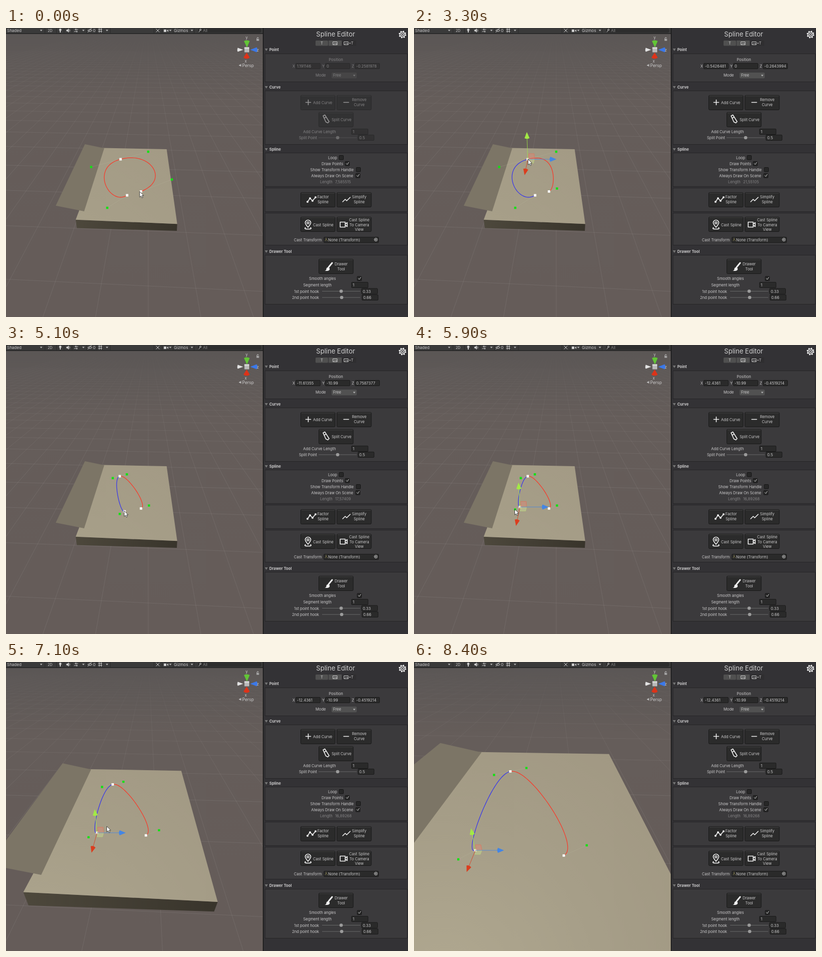
Write an HTML page that moves like this. It is 800 px wide and 577 px high and loops after 9200 ms.

```html
<!DOCTYPE html>
<html lang="en">
<head>
<meta charset="utf-8">
<title>Spline Editor</title>
<style>
html, body { margin: 0; width: 100%; height: 100%; overflow: hidden; background: #333235; }
svg { display: block; width: 800px; height: 577px; }
text { font: 7.6px Inter, Roboto, sans-serif; fill: #cbcacb; white-space: pre; }
.head { font-weight: 700; }
.mid { text-anchor: middle; }
.end { text-anchor: end; }
.bar { font-size: 8px; }
.icon { fill: none; stroke: #f0f0f0; stroke-width: 1.6; stroke-linecap: round; stroke-linejoin: round; }
.small { stroke: #c8c8c8; stroke-width: 1; }
</style>
</head>
<body>
<svg id="stage" viewBox="0 0 800 577" xmlns="http://www.w3.org/2000/svg">
  <defs>
    <linearGradient id="ground" x1="0" y1="0" x2="0" y2="1">
      <stop offset="0" stop-color="#5a5655"/><stop offset=".25" stop-color="#655d5a"/><stop offset="1" stop-color="#655c59"/>
    </linearGradient>
    <linearGradient id="fade" gradientUnits="userSpaceOnUse" x1="0" y1="12" x2="0" y2="260">
      <stop offset="0" stop-color="#fff" stop-opacity="0"/><stop offset=".4" stop-color="#fff" stop-opacity=".04"/>
      <stop offset="1" stop-color="#fff" stop-opacity=".075"/>
    </linearGradient>
    <radialGradient id="topFace" gradientUnits="userSpaceOnUse" cx="60" cy="640" r="620">
      <stop offset="0" stop-color="#b0a890"/><stop offset=".5" stop-color="#a69e88"/><stop offset="1" stop-color="#a09782"/>
    </radialGradient>
    <linearGradient id="frontFace"><stop offset="0" stop-color="#4d483c"/><stop offset="1" stop-color="#38342b"/></linearGradient>
  </defs>
  <rect width="512" height="577" fill="url(#ground)"/>
  <path id="grid" fill="none" stroke="url(#fade)"/>
  <path id="front" fill="url(#frontFace)"/>
  <path id="top" fill="url(#topFace)"/>
  <path id="flap" fill="#7c7566"/>
  <path id="arms" fill="none" stroke="#cdd8b8" stroke-opacity=".13"/>
  <path id="right" fill="none" stroke-width="1.2"/>
  <path id="left" fill="none" stroke-width="1.2"/>
  <path id="handles" fill="#12e212"/>
  <path id="nodes" fill="#fff"/>
  <g id="gizmo"></g>
  <g id="axes"></g>
  <path id="cursor" d="M0 0V11.2L2.7 8.8L4.5 12.7L6.4 11.8L4.6 8H8Z" fill="#fff" stroke="#222" stroke-width=".8"/>
  <g id="toolbar"></g>
  <g id="panel"></g>
</svg>
<script>
const $ = id => document.getElementById(id);
const set = (id, name, value) => $(id).setAttribute(name, value);

// ---- static interface ----
const text = (x, y, s, more = '') => `<text x="${x}" y="${y}" ${more}>${s}</text>`;
const mid = (x, y, s) => text(x, y, s, 'class="mid"');
const rect = (x, y, w, h, fill, more = '') => `<rect x="${x}" y="${y}" width="${w}" height="${h}" fill="${fill}" ${more}/>`;
const icon = (d, cls = '') => `<path class="icon ${cls}" d="${d}"/>`;
const arrow = (x, y) => `<path d="M${x - 2.5} ${y - 1.5}h5l-2.5 3z" fill="#b5b5b5"/>`;
const box = (y, h) => rect(515.5, y + .5, 283, h, '#3b3a3c', 'stroke="#262527"');
const button = (x, y) => rect(x + .5, y + .5, 68.5, 29, '#2b2b2b', 'rx="2" stroke="#191919"') +
  `<path d="M${x + 2} ${y + 1.5}h66" stroke="#444"/>`;
const field = (x, y, w, s, id = '') => rect(x + .5, y + .5, w - 1, 11, '#2a2a2a', 'rx="1.5" stroke="#1b1b1b"') +
  text(x + 3, y + 9, s, id && `id="${id}"`);
const check = (x, y, on) => rect(x - 4, y - 4, 8.5, 8.5, '#282828', 'rx="1" stroke="#151515"') +
  (on ? icon(`M${x - 2} ${y}l2 2l3.2 -4.4`, 'small') : '');
const slider = (x, y, knob) => `<path d="M${x} ${y}h76" stroke="#686868"/><circle cx="${knob}" cy="${y}" r="3.3" fill="#9b9b9b"/>`;
const heading = (y, s) => `<path d="M515 ${y - 5}h6l-3 5z" fill="#777"/>` + text(524, y, s, 'class="head"');
const picture = (x, y) => icon(`M${x} ${y}h8v6h-8zM${x + 1} ${y + 5}l2.5 -2.5l1.5 1.5l1.5 -1l1 2`, 'small');

$('panel').innerHTML = rect(511, 0, 289, 577, '#333235') + rect(511, 0, 1.5, 577, '#1a1a1a') +
  text(656, 17, 'Spline Editor', 'class="mid" style="font-size:13px;fill:#d2d2d2"') +
  '<g fill="none" stroke="#f2f2f2"><circle cx="789" cy="13" r="6.4" stroke-width="2.2" stroke-dasharray="2.5 2.53"/>' +
  '<circle cx="789" cy="13" r="5" stroke-width="1.5"/><circle cx="789" cy="13" r="2.2" stroke-width="1.3"/></g>' +
  rect(616, 25, 25, 10.5, '#505050', 'rx="1.5"') + rect(642, 25, 26, 10.5, '#505050') + rect(669, 25, 28, 10.5, '#2f2e30', 'rx="1.5"') +
  mid(628.5, 33, 'T') + picture(651, 27.5) + picture(673, 27.5) + text(682, 33, '+T') +
  heading(46, 'Point') + box(51, 56) +
  '<g id="pointBox">' + mid(656.5, 66, 'Position') +
  text(570, 79, 'X') + field(576, 70, 50, '', 'px') + text(629, 79, 'Y') + field(635, 70, 50, '', 'py') +
  text(688, 79, 'Z') + field(694, 70, 50, '', 'pz') +
  text(616, 97, 'Mode') + rect(648, 89, 50, 11.5, '#515151', 'rx="2"') + text(651, 97, 'Free') + arrow(693, 95) + '</g>' +
  heading(121, 'Curve') + box(125, 107) +
  '<g id="curveBox">' + button(586, 134) + button(658, 134) + button(622, 168) +
  icon('M596.5 148.5h10M601.5 143.5v10') + text(611, 151.5, 'Add Curve') +
  icon('M672 148.5h10') + mid(703, 146, 'Remove') + mid(703, 156, 'Curve') +
  icon('M631 175.5l3.500 -2l8.500 13.500l-2.500 2.500l-4 -2zM633 180l4 -2') + text(648, 185.5, 'Split Curve') +
  text(656.5, 209.5, 'Add Curve Length', 'class="end"') + field(687, 201, 34, '1') +
  text(619, 221.5, 'Split Point', 'class="end"') + slider(622, 219, 660) + field(700, 213, 33, '0.5') + '</g>' +
  heading(245, 'Spline') + box(249, 67) + box(319, 47) + box(369, 64) +
  [['Loop', 659, 258.5, 667, 0], ['Draw Points', 671, 270.5, 679, 1], ['Show Transform Handle', 692, 282.5, 701, 0],
   ['Always Draw On Scene', 691, 294.5, 700, 1]].map(([s, x, y, c, on]) => text(x, y + 3, s, 'class="end"') + check(c, y, on)).join('') +
  '<g opacity=".5">' + text(625, 309.5, 'Length') + text(655, 309.5, '', 'id="length"') + '</g>' +
  button(586, 328) + button(658, 328) + button(586, 377) + button(658, 377) +
  icon('M600 347l5 -7l5 5l6 -7') + '<g fill="#f0f0f0"><circle cx="600" cy="347" r="2"/><circle cx="605" cy="340" r="2"/><circle cx="610" cy="345" r="2"/><circle cx="616" cy="338" r="2"/></g>' +
  mid(631, 340, 'Factor') + mid(631, 350, 'Spline') +
  icon('M670 347l5 -5l3 3l7 -7') + mid(703, 340, 'Simplify') + mid(703, 350, 'Spline') +
  icon('M601 398c-4 -5 -5.500 -7 -5.500 -9a5.500 5.500 0 0 1 11 0c0 2 -1.500 4 -5.500 9zM599 389a2 2 0 1 0 4 0a2 2 0 1 0 -4 0M596 398.500q-4 3 5 3t5 -3') +
  text(611, 395.5, 'Cast Spline') + icon('M665 387.500h10v10h-10zM675 391.500l4 -3v8l-4 -3') +
  mid(703, 386, 'Cast Spline') + mid(703, 395.5, 'To Camera') + mid(703, 405, 'View') +
  text(573, 425.5, 'Cast Transform') + field(632, 417, 110, '') +
  '<path d="M637 419v3l-2 3M637 422l3 3" fill="none" stroke="#b4a95e" stroke-dasharray="1.5 1"/>' + text(641, 425.5, 'None (Transform)') +
  icon('M733 422.500a3 3 0 1 0 6 0a3 3 0 1 0 -6 0', 'small') + '<circle cx="736" cy="422.5" r="1.2" fill="#ccc"/>' +
  heading(449, 'Drawer Tool') + box(453, 98) + button(622, 461) +
  '<path d="M642 477.500l7 -8.500" stroke="#f0f0f0" stroke-width="3" stroke-linecap="round"/>' +
  '<path d="M634 485q3.500 -1 3.500 -4t4 -3.500q3.500 2 2.500 5t-10 2.500z" fill="#f0f0f0"/>' +
  mid(667, 474, 'Drawer') + mid(667, 484, 'Tool') +
  text(656.5, 503, 'Smooth angles', 'class="end"') + check(703, 500, 1) +
  text(648, 516, 'Segment length', 'class="end"') + field(687, 507, 34, '1') +
  text(623, 528.5, '1st point hook', 'class="end"') + slider(629, 525.5, 667) + field(707, 519.5, 33, '0.33') +
  text(623, 541, '2nd point hook', 'class="end"') + slider(629, 538, 668) + field(708, 532, 33, '0.66');

$('toolbar').innerHTML = rect(0, 0, 511, 11, '#3a3a3a') + rect(0, 10.5, 511, 1.5, '#242424') +
  [77, 100, 115, 131, 160, 180, 207, 294, 310, 332, 374].map(x => rect(x, 0, 1, 10.5, '#2a2a2a')).join('') +
  text(2, 8, 'Shaded', 'class="bar"') + text(83, 8, '2D', 'class="bar" style="font-size:7px"') + text(334, 8, 'Gizmos', 'class="bar"') +
  rect(382, .5, 126, 9, '#2d2d2d', 'rx="4"') + text(392, 7.5, 'All', 'opacity=".55"') +
  [70, 154, 201, 327, 370].map(x => arrow(x, 5)).join('') +
  '<circle cx="108" cy="3.7" r="2.4" fill="#ccc"/><path d="M107 5h2v4h-2zM120 3.500h2l3 -2.500v8l-3 -2.500h-2zM314 3h5v5h-5zM320 5l3 -2v5z" fill="#ccc"/>' +
  icon('M126.500 3q1.500 2 0 4M137 3h6M136 7h6M139 1.500v3M141 5.500v3M163 5q4 -5 8 0q-4 4 -8 0M163 8.500l7 -8M184 2.500h7M184 6.500h7M185.500 1v8M189.500 1v8M299 2l6 6M305 2l-6 6M386 5l-2 3M385.500 3.500a1.500 1.500 0 1 0 3 0a1.500 1.500 0 1 0 -3 0', 'small') +
  text(173, 8, '0', 'class="bar"');

$('axes').innerHTML =
  '<path d="M461 39.500q-1.500 4 0 8l11 -4z" fill="#e2e2e2"/><path d="M486 43.500l13 -5q2.500 5 0 10z" fill="#3b78e8"/>' +
  '<path d="M473.500 26q5.500 -3 11.500 0l-5.500 13z" fill="#62c536"/><path d="M472.500 59l6.500 -10l6 10q-6 5 -12.500 0z" fill="#dc3319"/>' +
  rect(474.5, 38.5, 9.5, 10, '#b9b9b9') + rect(474.5, 38.5, 9.5, 3, '#d8d8d8') +
  `<g style="font-weight:700">${mid(479, 22, 'y')}${mid(501, 46.5, 'z')}${mid(477, 69, 'x')}</g>` +
  icon('M468 72.500l-4 2l4 2M464 74.500h4', 'small') + text(470, 77.5, 'Persp', 'style="font-size:8.5px"') +
  icon('M499.500 22v-1.500a1.500 1.500 0 0 1 3 0', 'small') + rect(498.5, 22, 5, 3.5, '#aaa');

// ---- timeline ----
const lerp = (a, b, u) => a + (b - a) * u;
const span = (t, a, b) => Math.min(1, Math.max(0, (t - a) / (b - a)));

// Keys are [time, ...values]; straight lines between them.
function track(keys, t) {
  let i = 0;
  while (i < keys.length - 2 && t >= keys[i + 1][0]) i++;
  const [a, b] = [keys[i], keys[i + 1]], u = span(t, a[0], b[0]);
  return a.slice(1).map((v, k) => lerp(v, b[k + 1], u));
}

const paths = {
  A: [[0, 268.7, 326.3], [9200, 268.7, 326.3]],
  Ah: [[2200, 330, 302.5], [2700, 284.5, 320.5]],
  B: [[3100, 228, 262], [3200, 226.4, 262]],
  Br: [[3800, 283, 247], [4500, 240.5, 258.3]],
  Bl: [[3400, 169.5, 277.5], [3600, 212.5, 265.7]],
  Ch: [[4600, 201.5, 359], [4900, 231.4, 339], [5000, 231.4, 339], [5600, 201.3, 328.4]],
  C: [[5000, 241, 334], [5600, 210.9, 323.4]],
  cursor: [[0, 266, 326.5], [300, 269.5, 327.5], [1900, 269.5, 327.5], [2000, 330, 302], [2200, 330, 302], [2700, 285, 320],
    [3200, 227, 262], [3400, 227, 262], [3600, 213, 265], [3800, 213, 265], [3900, 282, 247], [4500, 241, 258], [4600, 241, 258],
    [4700, 201, 359], [4900, 231, 339], [5000, 240, 332.5], [5600, 211, 324], [5900, 200.5, 328], [8100, 200.5, 328], [8400, 50, 370]]
};

// Selected point with its coordinates and the spline length, from start to end of each step.
const steps = [
  { at: 0, to: 100, from: [1.191146, 0, -.2581978], len: [7.585515] },
  { at: 900, to: 1000, point: 'A', side: 'right', gizmo: true, from: [1.106397, 0, .1237561], len: [7.585515] },
  { at: 2000, to: 2100, point: 'Ah', side: 'right', gizmo: true, from: [.6014827, 0, 1.532674], len: [7.585515] },
  { at: 2300, to: 2700, point: 'Ah', side: 'right', from: [-11.94837, -10.99, 5.301746], end: [-12.71862, -10.99, 3.218475], len: [22.41673, 21.55105] },
  { at: 3200, to: 3300, point: 'B', side: 'right', gizmo: true, from: [-.5426481, 0, -.2643994], len: [21.55105] },
  { at: 3300, to: 3400, point: 'B', side: 'left', gizmo: true, from: [-.5426481, 0, -.2643994], len: [21.55105] },
  { at: 3500, to: 3600, point: 'Bl', side: 'left', from: [-14.92716, -10.99, -1.531826], end: [-15.61284, -10.99, -.4173952], len: [21.02647, 20.38415] },
  { at: 3900, to: 4500, point: 'Br', side: 'right', from: [-16.43917, -10.99, 3.184672], end: [-16.02835, -10.99, 1.127463], len: [20.31729, 18.25364] },
  { at: 4700, to: 4900, point: 'Ch', side: 'left', from: [-10.59372, -10.99, -.8613745], end: [-11.36418, -10.99, .5283916], len: [18.14752, 17.71037] },
  { at: 5000, to: 5600, point: 'C', side: 'left', from: [-11.44904, -10.99, 1.0008695], end: [-12.4361, -10.99, -.4519214], len: [17.710372, 16.89268] },
  { at: 5700, to: 5800, point: 'C', side: 'left', gizmo: true, from: [-12.4361, -10.99, -.4519214], len: [16.89268] }
];

// Camera dolly: scale about the view centre grows with nearness to the viewer.
const CX = 254.6, CY = 297.5, HORIZON = -22;
const dolly = t => (.433 * span(t, 6100, 6700) ** 2.3 + .737 * span(t, 6700, 7100) + .77 * (1 - (1 - span(t, 7100, 7700)) ** 2)) / 1000;
const project = (w, [x, y], height = 1) => {
  const s = 1 / (1 - w * height * (y - HORIZON));
  return [CX + (x - CX) * s, CY + (y - CY) * s];
};

const poly = pts => 'M' + pts.map(p => p.map(v => v.toFixed(2))).join('L');
const LOW = .93, HIGH = 1.05;

function gridPath(w) {
  const near = w ? Math.min(577, .9 / (w * LOW) + HORIZON) : 577;
  const line = (a, b) => poly([project(w, a, LOW), project(w, b, LOW)]);
  let d = '';
  for (let k = -20; k <= 20; k++) {
    const at = y => [283 + k * .175 * (y - HORIZON), y];
    d += line(at(0), at(near));
  }
  for (let n = -2; n < 26; n++) {
    const at = x => [x, HORIZON + (1 + x / 11000) / (.0024 + n * .00049)];
    if (at(811)[1] < near) d += line(at(-300), at(811));
  }
  return d;
}

// A cubic lying on the slab, seen in perspective: each control point weighs as much as its depth.
function curvePath(w, controls) {
  const seen = controls.map(c => project(w, c));
  const depth = controls.map(c => 1 / (c[1] - HORIZON) - w);
  const pts = [];
  for (let i = 0; i <= 48; i++) {
    const u = i / 48, v = 1 - u;
    const weights = [v * v * v, 3 * v * v * u, 3 * v * u * u, u * u * u].map((b, k) => b * depth[k]);
    const total = weights.reduce((a, b) => a + b);
    pts.push([0, 1].map(axis => weights.reduce((sum, b, k) => sum + b * seen[k][axis], 0) / total));
  }
  return poly(pts);
}

function cone(x, y, dx, dy, color) {
  const n = Math.hypot(dx, dy), ux = dx / n, uy = dy / n;
  const tx = x + dx, ty = y + dy, bx = tx - 12 * ux, by = ty - 12 * uy;
  return `<path d="M${x} ${y}L${bx} ${by}" stroke="${color}" stroke-opacity=".8"/>` +
    `<path d="M${tx} ${ty}L${bx - 5 * uy} ${by + 5 * ux}Q${bx - 3 * ux} ${by - 3 * uy} ${bx + 5 * uy} ${by - 5 * ux}Z" fill="${color}"/>`;
}

function gizmoMarkup([x, y]) {
  const down = 32 + (y - 264) * .1, up = 54 - (y - 264) * .09;
  const red = [(x - 283) / (y - HORIZON) * down, down], green = [(x - 255) * .065, -up];
  const plane = (v, size, stroke, fill) => {
    const k = size / Math.abs(v[1]), o = [v[0] * k, v[1] * k];
    return `<path d="M${x + 2} ${y}h11l${o}h-11z" fill="${fill}" fill-opacity=".35" stroke="${stroke}" stroke-opacity=".8"/>`;
  };
  return plane(green, 11, '#e0735c', '#f08070') + plane(red, 8, '#b9d478', '#d8eaa0') +
    cone(x, y, ...red, '#db3d1e') + cone(x, y, 57, 0, '#4486e4') + cone(x, y, ...green, '#a2ea45');
}

const show = v => String(Number(v.toPrecision(7)));

function render(t) {
  const w = dolly(t), flat = {}, p = {};
  for (const name in paths) {
    flat[name] = track(paths[name], t);
    p[name] = project(w, flat[name]);
  }

  const at = (x, y, height) => project(w, [x, y], height);
  const frontEdge = [at(138.7, 382.8), at(340.7, 391.2)];
  set('grid', 'd', gridPath(w));
  set('front', 'd', poly([...frontEdge, at(340, 405, LOW), at(141, 399.5, LOW)]));
  set('top', 'd', poly([at(193, 239.5), at(319.7, 242), frontEdge[1], frontEdge[0]]));
  set('flap', 'd', poly([at(157, 232, HIGH), at(195.5, 240), at(155.5, 366, 1.02), at(99, 354.8, HIGH)]));

  const step = steps.filter(s => s.at <= t).pop();
  set('right', 'd', curvePath(w, [flat.A, flat.Ah, flat.Br, flat.B]));
  set('left', 'd', curvePath(w, [flat.B, flat.Bl, flat.Ch, flat.C]));
  for (const side of ['left', 'right']) set(side, 'stroke', step.side === side ? '#3434ee' : '#fa3728');
  set('arms', 'd', [[p.A, p.Ah], [p.B, p.Br], [p.B, p.Bl], [p.C, p.Ch]].map(poly).join(''));
  const dots = (names, r) => names.map(n => `M${p[n][0] - r} ${p[n][1] - r}h${2 * r}v${2 * r}h${-2 * r}z`).join('');
  set('nodes', 'd', dots(['A', 'B', 'C'], 2.4));
  set('handles', 'd', dots(['Ah', 'Br', 'Bl', 'Ch'], 2.2));
  $('gizmo').innerHTML = step.gizmo ? gizmoMarkup(p[step.point]) : '';

  set('cursor', 'transform', `translate(${flat.cursor})`);
  set('cursor', 'visibility', t < 8400 ? 'visible' : 'hidden');

  const u = span(t, step.at, step.to), end = step.end || step.from;
  ['px', 'py', 'pz'].forEach((id, i) => $(id).textContent = show(lerp(step.from[i], end[i], u)));
  $('length').textContent = show(lerp(step.len[0], step.len[1] ?? step.len[0], u)).replace('.', ',');
  for (const id of ['pointBox', 'curveBox']) set(id, 'opacity', step.point ? 1 : .5);
}

const LOOP = 9200, TICK = 100, start = performance.now();
function frame() {
  const t = (performance.now() - start) % LOOP;
  render(Math.floor(t / TICK) * TICK);
  requestAnimationFrame(frame);
}
frame();
</script>
</body>
</html>
```
